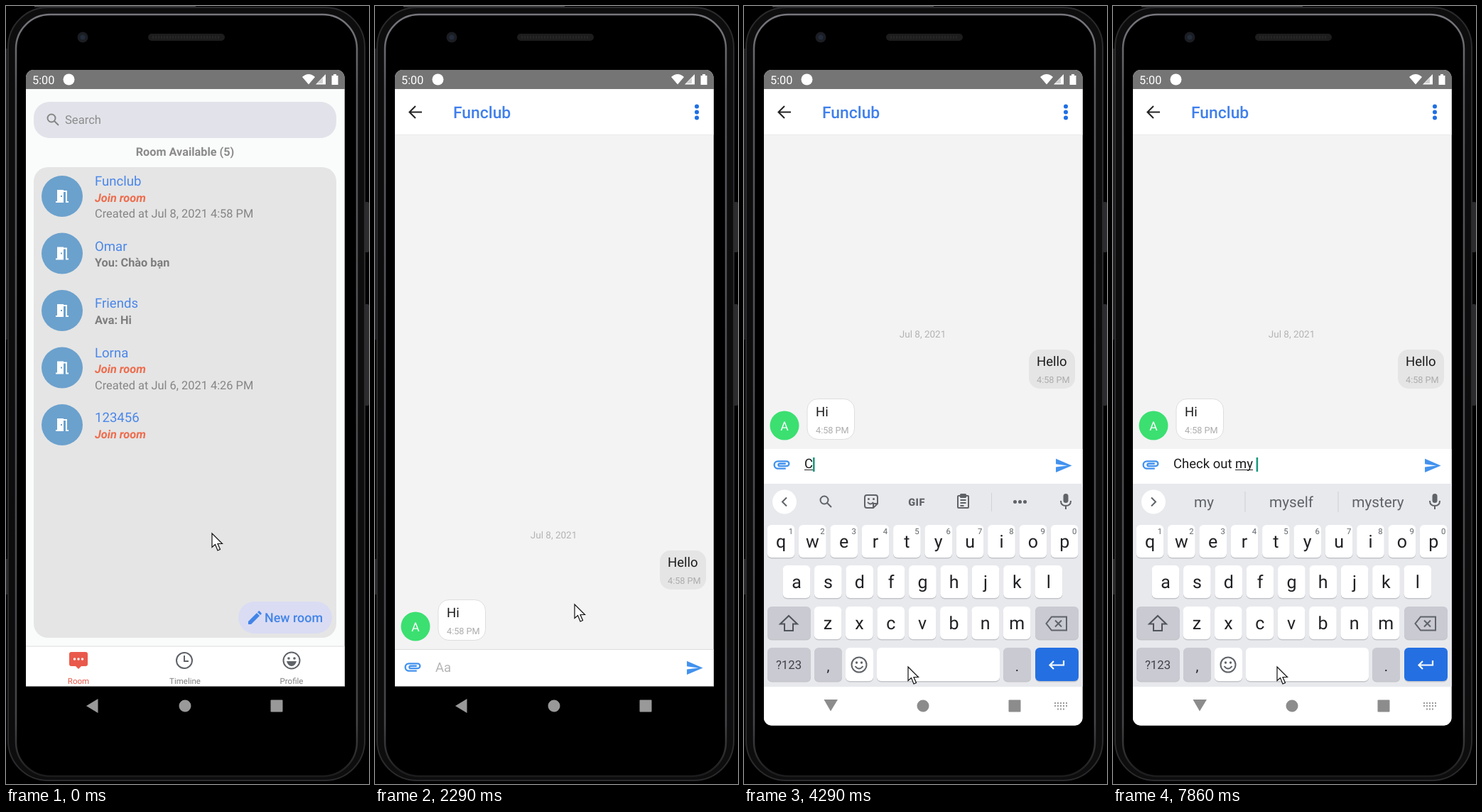
These frames come from a looping animation (511 by 1096 pixels, 8 s). An HTML page:

```html
<!DOCTYPE html>
<html lang="en">
<head>
<meta charset="utf-8">
<title>Chat room demo</title>
<style>
  html, body { margin: 0; width: 100%; height: 100%; overflow: hidden; background: #000; }
  svg { display: block; width: 511px; height: 1096px; font-family: Roboto, "Open Sans", sans-serif; }
  text { white-space: pre; text-rendering: geometricPrecision; }
  .mid { text-anchor: middle; }
  .name { font-size: 18.6px; fill: #4a87ea; }
  .join { font: italic bold 16.3px Roboto, sans-serif; fill: #ee6c4d; }
  .last { font-weight: bold; font-size: 16.3px; fill: #7d7d7d; }
  .made { font-size: 16.4px; fill: #858585; }
  .tab { font-size: 11.5px; fill: #808080; text-anchor: middle; }
  .time { font-size: 12.7px; fill: #acacac; }
  .body { font-size: 18.5px; fill: #1c1c1c; }
  .line { fill: none; stroke: #5f6368; stroke-width: 2; }
  .key { font-size: 25px; fill: #202124; text-anchor: middle; }
  .digit { font-size: 11.3px; fill: #5f6368; text-anchor: middle; }
  .word { font-size: 20.7px; fill: #5f6368; text-anchor: middle; }
</style>
</head>
<body>
<svg viewBox="0 0 511 1096">
  <defs>
    <clipPath id="screen"><rect x="28" y="90" width="448.500" height="923.500" rx="11"/></clipPath>
    <clipPath id="app"><rect x="28" y="117" width="449" height="841.500"/></clipPath>
    <linearGradient id="rim" x2="0" y2="1">
      <stop offset="0" stop-color="#77777d"/><stop offset=".1" stop-color="#58585d"/>
      <stop offset=".93" stop-color="#454549"/><stop offset="1" stop-color="#1c1c1e"/>
    </linearGradient>
    <g id="lens" fill="none" stroke-width="2"><circle r="5.5" cx="-2" cy="-2"/><path d="M2 2L8 8"/></g>
    <path id="door" d="M2 -6V9H-9V7H-7V-9H2V-8H7V7H9V9H5V-6ZM-2 -1V1H0V-1Z" fill="#fff" fill-rule="evenodd"/>
  </defs>

  <!-- phone body -->
  <rect width="511" height="1096"/>
  <g fill="#2c2c2e">
    <rect x="505" y="276" width="6" height="71" rx="2"/><rect x="505" y="420" width="6" height="143" rx="2"/>
    <rect y="60" width="1.500" height="410"/><rect y="779" width="2" height="50"/>
    <rect x="40" width="227" height="1.500" fill="#4a4a4d"/>
  </g>
  <rect x="3" y="2" width="502" height="1089" rx="56" fill="#0d0d0e" stroke="#2b2b2e" stroke-width="2"/>
  <rect x="14" y="12" width="480" height="1073" rx="48" stroke="url(#rim)" stroke-width="2.500"/>
  <circle cx="108" cy="44" r="7.5" fill="#1b1d22"/><circle cx="108" cy="44" r="3.5" fill="#222c3a"/>
  <rect x="200" y="39" width="108" height="10" rx="5" fill="#1d1d1e"/>
  <path d="M206 44H302" stroke="#262627" stroke-width="4" stroke-dasharray="2 2"/>

  <g clip-path="url(#screen)">
    <rect x="28" y="90" width="449" height="869" fill="#fff"/>

    <g clip-path="url(#app)">
      <g id="list">
        <rect x="28" y="117" width="449" height="842" fill="#fafcfb"/>
        <rect x="39" y="135" width="426" height="51" rx="22" fill="#e2e3ea"/>
        <use href="#lens" x="66" y="160" stroke="#858585"/>
        <text x="83" y="166" font-size="16.600" fill="#8c8c8c">Search</text>
        <text class="mid" x="252" y="211" font-size="16.250" font-weight="bold" fill="#8a8a8a">Room Available (5)</text>
        <rect x="39" y="227" width="426" height="663" rx="20" fill="#e5e5e5"/>
        <g id="rows"></g>
        <rect x="327" y="839" width="132" height="45" rx="22.5" fill="#dadcf4"/>
        <path d="M341 867L353 855L357 859L345 871H341ZM354 854L356 852Q357 852 360 856L358 858Z" fill="#4285e8"/>
        <text x="364" y="868" font-size="17.900" font-weight="500" fill="#4285e8">New room</text>
        <rect x="28" y="902" width="449" height="60" fill="#fff"/>
        <path d="M28 902H477" stroke="#dcdcdc"/>
        <path d="M92 910H112Q115 910 115 913V927Q115 930 112 930H106L102 934L98 930H92Q89 930 89 927V913Q89 910 92 910Z" fill="#e9594b"/>
        <path d="M96.5 920H108" stroke="#fff" stroke-width="3.4" stroke-linecap="round" stroke-dasharray="0 5.5"/>
        <g class="line">
          <circle cx="251" cy="922" r="11"/><path d="M251 915V923H257"/>
          <circle cx="402" cy="922" r="11.5"/>
        </g>
        <g fill="#5f6368"><circle cx="398" cy="919" r="1.8"/><circle cx="406" cy="919" r="1.8"/><path d="M395 923H409Q407 930 402 930Q397 930 395 923Z"/></g>
        <text class="tab" x="102" y="954.5" style="fill:#e9594b">Room</text>
        <text class="tab" x="252" y="954.5">Timeline</text>
        <text class="tab" x="402" y="954.5">Profile</text>
      </g>

      <g id="chat">
        <rect x="28" y="117" width="449" height="842" fill="#f3f3f3"/>
        <rect x="28" y="117" width="449" height="64" fill="#fff"/>
        <path d="M28 181.5H477" stroke="#ebebeb"/>
        <path d="M66 149.500H49M57 141L48.500 149.500L57 158" fill="none" stroke="#222" stroke-width="2"/>
        <text x="110" y="158" font-size="22.900" font-weight="500" fill="#4080ec">Funclub</text>
        <g fill="#1f70e5"><circle cx="453" cy="141.500" r="3"/><circle cx="453" cy="149.500" r="3"/><circle cx="453" cy="157.500" r="3"/></g>
        <g id="msgs">
          <text class="mid" x="251.500" y="750" font-size="13.500" fill="#b3b3b3">Jul 8, 2021</text>
          <rect x="401" y="767" width="65" height="55" rx="15" fill="#e5e5e5"/>
          <text class="body" x="412" y="790">Hello</text><text class="time" x="412" y="814">4:58 PM</text>
          <rect x="89" y="836.500" width="66.500" height="57" rx="15" fill="#fff" stroke="#dedede"/>
          <text class="body" x="101" y="861">Hi</text><text class="time" x="101" y="885">4:58 PM</text>
          <circle cx="57" cy="874" r="20.500" fill="#3be071"/>
          <text class="mid" x="57" y="881" font-size="17.500" fill="#fff">A</text>
        </g>
        <g id="bar"><rect x="28" y="906" width="449" height="53" fill="#fff"/><path id="edge" d="M28 906.500H477" stroke="#dcdcdc"/></g>
        <rect id="under" x="28" y="673" width="449" height="286" fill="#fafafa"/>
        <g id="tools">
          <g fill="#4292ee">
            <path transform="translate(39.200 917.100) scale(1.150)" d="M2 12.500C2 9.460 4.460 7 7.500 7H18A4 4 0 0 1 18 15H9.500A2.500 2.500 0 0 1 9.500 10H17V12H9.400C8.850 12 8.850 13 9.400 13H18A2 2 0 0 0 18 9H7.500A3.500 3.500 0 0 0 7.500 16H17V18H7.500C4.460 18 2 15.540 2 12.500Z"/>
            <path transform="translate(436.900 919.600) scale(1.070)" d="M2 21L23 12L2 3V10L17 12L2 14Z"/>
          </g>
          <text id="hint" x="85" y="937.500" font-size="18.500" fill="#b5b5b5">Aa</text>
        </g>
        <text id="typed" class="body" x="85"></text>
        <path id="mark" stroke="#222"/>
        <rect id="caret" width="2.500" fill="#17987a"/>
      </g>
    </g>

    <rect x="28" y="90" width="449" height="27" fill="#757575"/>
    <g fill="#fff">
      <text x="37" y="109.500" font-size="16.300">5:00</text>
      <circle cx="88.500" cy="103.500" r="8"/>
      <path d="M417 100Q426 92 435 100L426 110.500ZM450 96V110.500H436ZM461 96H465V98H467.500V111H458.500V98H461Z"/>
      <path d="M446 101V109H438Z" fill="#757575" opacity=".35"/>
    </g>

    <g id="board">
      <rect x="28" y="673" width="449" height="345" fill="#e8e9ed"/>
      <circle cx="57" cy="698.500" r="17" fill="#fff"/>
      <path id="chevron" class="line"/>
      <g id="icons">
        <use href="#lens" x="115" y="698" stroke="#5f6368"/>
        <g class="line">
          <path d="M173 689H185Q188 689 188 692V701L182 707H173Q170 707 170 704V692Q170 689 173 689ZM182 707V701H188M174 699Q178 704 182 699"/>
          <rect x="301" y="690" width="15" height="17" rx="1"/><path d="M304.500 696H312.500M304.500 700H312.500M304.500 704H309.500"/>
        </g>
        <g fill="#5f6368">
          <circle cx="175.500" cy="694.500" r="1.500"/><circle cx="182.500" cy="694.500" r="1.500"/>
          <rect x="304" y="687" width="9" height="6" rx="1.500"/>
          <circle cx="381.500" cy="698.500" r="2.500"/><circle cx="388.500" cy="698.500" r="2.500"/><circle cx="395.500" cy="698.500" r="2.500"/>
          <text class="mid" x="243" y="703.500" font-size="14.500" font-weight="900" letter-spacing=".5">GIF</text>
        </g>
        <path d="M348.500 686V712" stroke="#d2d3d7"/>
      </g>
      <g id="words">
        <path d="M186 684V713M317 684V713" stroke="#cdced3"/>
        <text class="word" x="128" y="706"></text><text class="word" x="251" y="706"></text><text class="word" x="373" y="706"></text>
      </g>
      <rect x="449.500" y="687" width="7" height="13" rx="3.500" fill="#5f6368"/>
      <path class="line" d="M446 697Q446 704 453 704Q460 704 460 697M453 704V709"/>
      <g id="keys"></g>
      <path id="shift" d="M63 859L75 870.500H69V880H57V870.500H51Z" stroke="#50545a" stroke-width="2"/>
      <path class="line" d="M433 860.500H454V879.500H433L425.500 870ZM438 865.500L447 874.500M447 865.500L438 874.500"/>
      <text class="mid" x="63" y="934" font-size="16.800" fill="#404348">?123</text>
      <text class="key" x="118.500" y="937" style="font-size:20px">,</text>
      <text class="key" x="384.500" y="937" style="font-size:20px">.</text>
      <g class="line"><circle cx="162" cy="928" r="10.500"/><path d="M156.500 930Q162 937 167.500 930"/></g>
      <g fill="#5f6368"><circle cx="158.500" cy="925" r="1.700"/><circle cx="165.500" cy="925" r="1.700"/></g>
      <path d="M450 922V928.500H431M436 923L430.500 928.500L436 934" fill="none" stroke="#fff" stroke-width="2.200"/>
    </g>

    <rect id="dark" x="28" y="958.500" width="449" height="56"/>
    <g id="nav" fill="#999"><path d="M113 986L129.500 976V996Z"/><circle cx="252" cy="986" r="8.500"/><rect x="372.500" y="977.500" width="17" height="17" rx="1"/></g>
    <g id="light">
      <rect x="28" y="959" width="449" height="55" fill="#fff"/>
      <g fill="#8c8c8c"><path d="M112.500 977H132L122 993.500Z"/><circle cx="252" cy="986" r="8.500"/><rect x="372.500" y="977.500" width="17" height="17" rx="1"/></g>
      <path d="M437 982H455M437 986H455M441 990.500H451" stroke="#9a9a9a" stroke-width="2" stroke-dasharray="2 2"/>
    </g>
  </g>

  <path id="mouse" d="M0 0V19.500L4.500 15.500L8 24L11.500 22.500L8 14.500H14.500Z" fill="#fff" stroke="#111" stroke-width="1.200"/>
</svg>

<script>
const $ = id => document.getElementById(id);
const LOOP = 8000;

// Room list
const rooms = [
  ["Funclub", "Join room", "Created at Jul 8, 2021 4:58 PM"],
  ["Omar", "You: Chào bạn"],
  ["Friends", "Ava: Hi"],
  ["Lorna", "Join room", "Created at Jul 6, 2021 4:26 PM"],
  ["123456", "Join room"]
];
const subClass = s => s === "Join room" ? "join" : "last";
$("rows").innerHTML = rooms.map(([name, sub, made], i) => {
  const y = 268 + 80.5 * i, top = made ? y - 15 : y - 4;
  return `<g><circle cx="79" cy="${y}" r="29" fill="#6ba1cd"/><use href="#door" x="79" y="${y}"/>
    <text class="name" x="125" y="${top}">${name}</text>
    <text class="${subClass(sub)}" x="125" y="${top + 22.7}">${sub}</text>
    <text class="made" x="125" y="${top + 45}">${made || ""}</text></g>`;
}).join("");
const firstRow = $("rows").firstElementChild;
const firstSub = firstRow.querySelectorAll("text")[1];

// Keyboard
const GAP = 44.35;
const box = (x, y, w, h, fill) =>
  `<rect x="${x}" y="${y + 1.5}" width="${w}" height="${h}" rx="6" fill="#c3c5ca"/>
   <rect x="${x}" y="${y}" width="${w}" height="${h}" rx="6" fill="${fill}"/>`;
const keyRow = (letters, x0, y, digits) => [...letters].map((c, i) => {
  const x = x0 + GAP * i;
  return box(x - 19.3, y, 38.6, 46, "#fff") + `<text class="key letter" x="${x}" y="${y + 31.5}">${c}</text>` +
    (digits ? `<text class="digit" x="${x + 14}" y="${y + 13}">${(i + 1) % 10}</text>` : "");
}).join("");
const GREY = "#c9cad2";
$("keys").innerHTML =
  keyRow("qwertyuiop", 52, 731, true) + keyRow("asdfghjkl", 74, 788) + keyRow("zxcvbnm", 118, 846) +
  box(33, 846, 61, 46, GREY) + box(410, 846, 61, 46, GREY) +
  box(33, 904, 61, 47, GREY) + box(99, 904, 39, 47, GREY) + box(143, 904, 39, 47, "#fff") +
  box(187, 904, 173, 47, "#fff") + box(365, 904, 39, 47, GREY) + box(410, 904, 61, 47, "#2470e2");
const letters = [...document.querySelectorAll(".letter")];
const slots = [...document.querySelectorAll(".word")];

// Each step changes part of the state; text after "|" is underlined.
const steps = [
  [0, { mouse: [290, 743], press: 1, sub: "Join room", zoom: 1, fade: 1, chat: 0, msgs: 0, up: 0, tight: 0,
        board: null, boardFade: 1, dark: 1, caps: 1, text: "", caret: 0, words: null }],
  [430, { mouse: [325, 800] }],
  [570, { mouse: [369, 858] }],
  [710, { mouse: [335, 620] }],
  [860, { mouse: [262, 278] }],
  [1000, { mouse: [249, 288] }],
  [1430, { press: .3, sub: "Ava: Hi" }],
  [1710, { press: .5, zoom: 1.073, fade: .4 }],
  [1860, { chat: 1 }],
  [2000, { mouse: [252, 420], msgs: 1 }],
  [2140, { mouse: [269, 690] }],
  [2290, { mouse: [281, 843] }],
  [2430, { mouse: [275, 885] }],
  [2570, { mouse: [250, 916] }],
  [2710, { mouse: [236, 927] }],
  [2860, { mouse: [231, 931], caret: 1 }],
  [3000, { msgs: 0, up: -285, board: 225, boardFade: .6, dark: .7 }],
  [3140, { board: 107, boardFade: .85, dark: .33 }],
  [3290, { board: 0, boardFade: 1, dark: 0 }],
  [3430, { msgs: 1 }],
  [3860, { text: "|C" }],
  [4000, { caps: 0 }],
  [4290, { tight: 1 }],
  [4430, { text: "|Ch" }],
  [4570, { words: "C Can Come" }],
  [4710, { text: "|Che" }],
  [4860, { text: "|Chec", words: "Che Check Chef" }],
  [5000, { text: "|Check", words: "Chec Check Checks" }],
  [5140, { words: "Check checked checking" }],
  [5290, { text: "|Check " }],
  [5710, { caret: 0 }],
  [5860, { caret: 1 }],
  [6140, { text: "Check |o" }],
  [6290, { text: "Check |ou", words: "o out on" }],
  [6570, { text: "Check |out", words: "out outside our" }],
  [6710, { text: "Check |out " }],
  [7000, { text: "Check out |m" }],
  [7140, { words: "m my more" }],
  [7290, { text: "Check out |my" }],
  [7710, { words: "my myself mystery" }],
  [7860, { text: "Check out |my " }]
];
const states = [];
steps.forEach(([, change], i) => states.push({ ...states[i - 1], ...change }));

const pen = document.createElement("canvas").getContext("2d");
const width = s => { pen.font = "18.5px Roboto, 'Open Sans', sans-serif"; return pen.measureText(s).width; };
const show = (id, on) => $(id).style.display = on ? "" : "none";
const set = (id, attrs) => { for (const k in attrs) $(id).setAttribute(k, attrs[k]); };
const shiftY = (id, y) => set(id, { transform: `translate(0 ${y})` });

function drawInput(s) {
  const [plain, marked = ""] = s.text.split("|");
  const y = 937.5 + s.up - (s.tight ? 1.5 : 0);
  const full = plain + marked;
  const x1 = 85 + width(plain), x2 = 85 + width(full.trimEnd());
  $("typed").textContent = full;
  set("typed", { y });
  set("mark", { d: marked ? `M${x1} ${y + 2.5}H${x2}` : "" });
  set("caret", { x: 85 + width(full), y: y - (full ? 15 : 19), height: full ? 20 : 25 });
  show("caret", s.caret);
  show("hint", !full);
}

function draw(s) {
  set("mouse", { transform: `translate(${s.mouse})` });
  firstRow.style.opacity = s.press;
  firstSub.textContent = s.sub;
  firstSub.setAttribute("class", subClass(s.sub));
  set("list", { opacity: s.fade, transform: `translate(252 540) scale(${s.zoom}) translate(-252 -540)` });

  show("list", !s.chat);
  show("chat", s.chat);
  show("msgs", s.msgs);
  show("under", s.up);
  show("edge", !s.tight);
  shiftY("msgs", s.up + 2 * s.tight);
  shiftY("bar", s.up + 3 * s.tight);
  shiftY("tools", s.up);
  drawInput(s);

  show("board", s.board !== null);
  shiftY("board", s.board || 0);
  set("board", { opacity: s.boardFade });
  letters.forEach(k => k.textContent = s.caps ? k.textContent.toUpperCase() : k.textContent.toLowerCase());
  set("shift", { fill: s.caps ? "#50545a" : "none" });
  show("icons", !s.words);
  show("words", s.words);
  if (s.words) s.words.split(" ").forEach((w, i) => slots[i].textContent = w);
  set("chevron", { d: s.words ? "M54 692.5L60 698.5L54 704.5" : "M60 692.5L54 698.5L60 704.5" });
  set("dark", { opacity: s.dark });
  set("nav", { opacity: s.dark });
  show("light", s.dark === 0);
}

const start = performance.now();
let shown = -1;
function tick() {
  const t = (performance.now() - start) % LOOP;
  const i = steps.findLastIndex(([at]) => at <= t);
  if (i !== shown) draw(states[shown = i]);
  requestAnimationFrame(tick);
}
tick();
</script>
</body>
</html>
```
